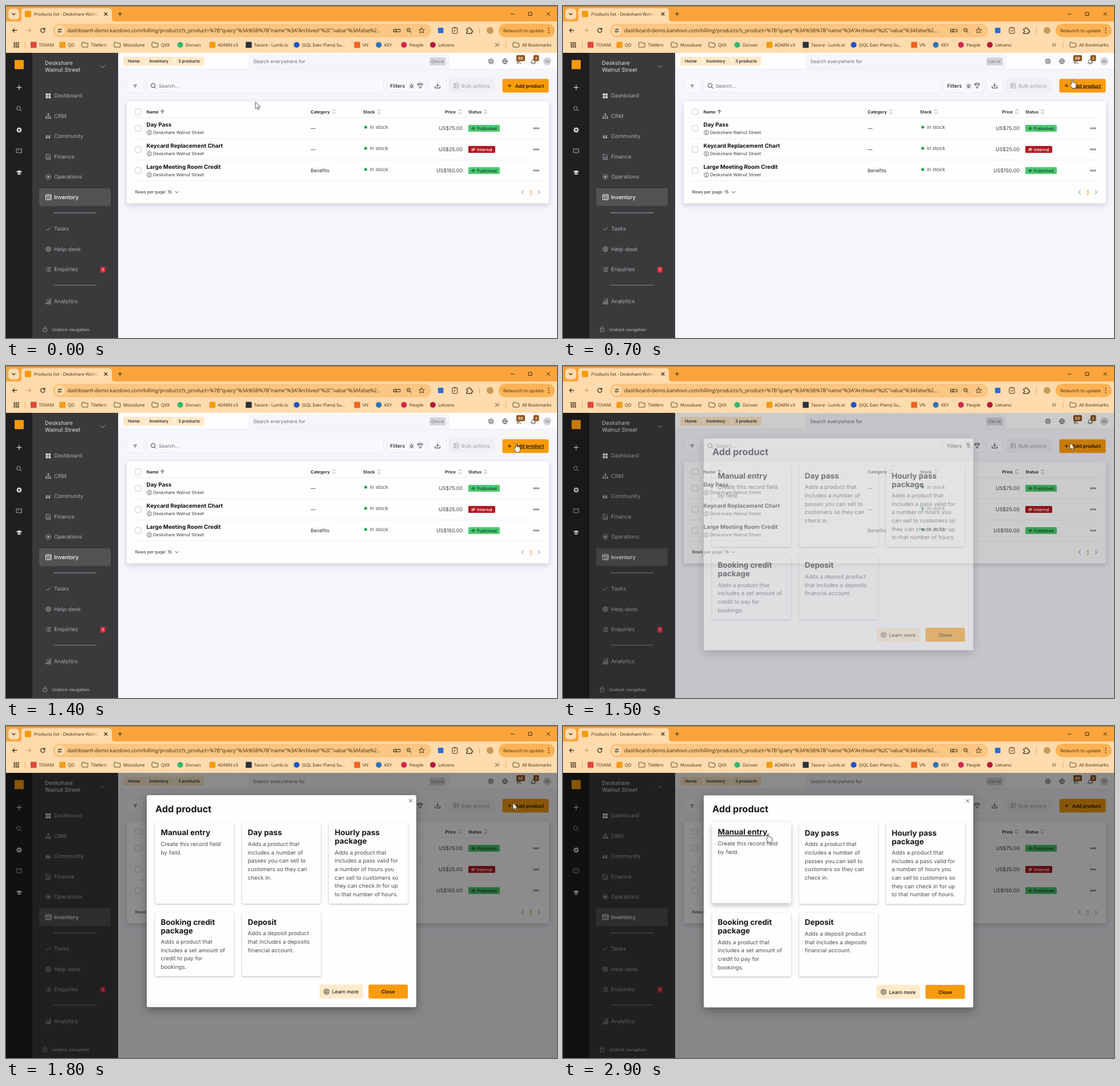
These frames come from a looping animation (963x581 px, 3 s). An HTML page:

```html
<!DOCTYPE html>
<html lang="en">
<head>
<meta charset="utf-8">
<title>Products list</title>
<style>
html, body { margin: 0; width: 100%; height: 100%; overflow: hidden; background: #f5f5fb; }
svg { display: block; width: 963px; height: 581px; }
text { font-family: Inter, "Liberation Sans", sans-serif; text-rendering: geometricPrecision; white-space: pre; }
.chrome text { font-family: "Open Sans", "Noto Sans", sans-serif; }
.hover .link { text-decoration: underline; }
.panel { filter: drop-shadow(0 3px 4px rgba(30, 30, 60, .2)); }
.sheet { filter: drop-shadow(0 5px 8px rgba(0, 0, 0, .35)); }
.card { filter: drop-shadow(0 1.5px 1.8px rgba(20, 20, 40, .32)); }
.card.hover { filter: drop-shadow(0 4px 5px rgba(20, 20, 40, .28)); }
</style>
</head>
<body>
<svg id="stage" viewBox="0 0 963 581" xmlns="http://www.w3.org/2000/svg"></svg>
<script>
const text = (x, cy, str, size, fill = '#1c1c1f', weight = 400, extra = '') =>
  `<text x="${x}" y="${cy + size * .36}" font-size="${size}" fill="${fill}" font-weight="${weight}" ${extra}>${str}</text>`;
const END = 'text-anchor="end"', MID = 'text-anchor="middle"', LINK = 'class="link"';
const box = (x, y, w, h, fill, r = 0, extra = '') =>
  `<rect x="${x}" y="${y}" width="${w}" height="${h}" rx="${r}" fill="${fill}" ${extra}/>`;
const dot = (x, y, r, fill, extra = '') => `<circle cx="${x}" cy="${y}" r="${r}" fill="${fill}" ${extra}/>`;
const ring = (x, y, r, color, w = .9) => dot(x, y, r, 'none', `stroke="${color}" stroke-width="${w}"`);
const line = (d, color, w = 1) =>
  `<path d="${d}" fill="none" stroke="${color}" stroke-width="${w}" stroke-linecap="round" stroke-linejoin="round"/>`;
const shape = (d, fill) => `<path d="${d}" fill="${fill}"/>`;

const lens = (x, y, color, r = 3.6) => ring(x, y, r, color, 1) + line(`M${x + r * .7} ${y + r * .7}l2.6 2.6`, color);
const buoy = (x, y, color, r = 4.3) => ring(x, y, r, color) + ring(x, y, r * .45, color) +
  line([[1, 1], [1, -1], [-1, 1], [-1, -1]].map(([a, b]) =>
    `M${x + a * r * .33} ${y + b * r * .33}l${a * r * .36} ${b * r * .36}`).join(''), color);
const folder = x => line(`M${x} 64.5q0-1 1-1h3l1.4 1.5h4.2q1 0 1 1v5q0 1-1 1h-8.6q-1 0-1-1z`, '#4a3a24', .9);
const eye = (x, y, color) => line(`M${x - 3.2} ${y}q3.2-4.4 6.4 0q-3.2 4.4-6.4 0z`, color, .8) + dot(x, y, 1.1, color);
const grid = (x, y, color) => [0, 1, 2, 3].map(i =>
  box(x + (i % 2) * 4.7, y + (i >> 1) * 4.7, 3.8, 3.8, color, .4)).join('');
const list = (x, y, color) => line([-3, 0, 3].map(d => `M${x - 1.6} ${y + d}h5.4M${x - 4} ${y + d}h.2`).join(''), color, 1);

function browser() {
  const ink = '#3b2a13';
  const marks = [
    [57.5, 'TOVAM', '#e0473a', 1], [108, 'QD', '#f59a1d', 1], [148.5, 'Tilefern'], [205, 'Mossdune'], [271, 'QVX'],
    [314, 'Dorvan', '#2fb872'], [370, 'ADMIN v3', '#f79a0a', 1], [433.5, 'Tavora - Lumb.io', '#27313c', 1],
    [517.5, '(SQL Exec Plans) Su...', '#1f55c8'], [623, 'VN', '#f4641e', 1], [661, 'KEY', '#2d73b8'],
    [705, 'People', '#d5264e'], [755.5, 'Letvano', '#b8183c']
  ];
  return box(0, 0, 963, 30, '#fca43c') + box(0, 0, 963, 1, '#b06d22') +
    shape('M22 27q5 0 5-5V9q0-5 5-5h148q5 0 5 5v13q0 5 5 5z', '#ffdbad') +
    box(0, 27, 963, 55, '#ffdbad') +
    box(4, 4.5, 19, 19, '#ffdbad', 6) + line('M11 13l2.5 2.5 2.5-2.5', ink, 1.2) +
    box(33, 8.5, 11, 11, '#f79a0a', 1) +
    `<g clip-path="url(#tab)">${text(49, 14, 'Products list - Deskshare Walnut', 7.7, ink)}</g>` +
    box(144, 6, 19, 16, 'url(#fade)') +
    line('M172 11.5l5 5m0-5l-5 5M196 13.8h6.5m-3.25-3.25v6.5', ink, 1.1) +
    line('M882.5 14h6M945 11l5.5 5.5m0-5.5l-5.5 5.5M913.5 11h5.5v5.5h-5.5z', ink, 1) +
    line('M19 42.7h-7.5m3.3-3.4l-3.4 3.4 3.4 3.4', ink, 1.2) +
    line('M36 42.7h7.5m-3.3-3.4l3.4 3.4-3.4 3.4', '#c59a66', 1.1) +
    line('M67.3 40.5a3.7 3.7 0 1 0 .6 2.8M67.9 38.7v2.5h-2.5', ink, 1.2) +
    box(82, 31, 661, 24, '#fbc582', 12) + dot(94, 43, 8.5, '#ffdbad') +
    line('M90.5 41h3M96.5 41h1M90.5 45h1M94.5 45h3', ink) + ring(95, 41, 1.3, ink) + ring(93, 45, 1.3, ink) +
    text(107, 43, 'dashboard-demo.kandovo.com/billing/products?s_product=%7B"query"%3A%5B%7B"name"%3A"Archived"%2C"value"%3Afalse%2...', 8.95, ink) +
    ring(679.8, 43, 2.5, ink, 1.2) + box(682, 40.8, 7, 4.4, 'none', 1, `stroke="${ink}"`) +
    lens(703.5, 42, ink, 3) + line('M702.2 42h2.6', ink, .8) +
    line('M726.5 38l1.4 3.2 3.4.3-2.6 2.3.8 3.4-3-1.8-3 1.8.8-3.4-2.6-2.3 3.4-.3z', ink, .9) +
    box(755, 38, 9.5, 9.5, '#2f6fd0', 1.5) +
    box(780, 38, 9, 10, 'none', 1.2, `stroke="${ink}"`) + line('M782.5 38.3h4M782.5 43l1.5 1.6 2.8-3', ink) +
    line('M805 40h2.5c-.4-3 4-3 3.6 0h2.5v2.7c2.7-.3 2.7 3.8 0 3.5v2h-8.6v-2.3c2.4.2 2.4-3.7 0-3.4z', ink, 1.2) +
    box(827, 37.5, 1, 11, '#f3ab50') + dot(846, 42.7, 6, '#c79b56') +
    box(861, 31, 98, 23.5, '#fdb355', 12) + text(869, 42.7, 'Relaunch to update', 7.8, ink) +
    [38.7, 42.7, 46.7].map(y => dot(948.5, y, 1, ink)).join('') +
    [0, 1, 2, 3, 4, 5, 6, 7, 8].map(i => box(13.5 + i % 3 * 3.4, 63.5 + (i / 3 | 0) * 3.4, 2.3, 2.3, ink)).join('') +
    box(33, 62.5, 1, 11, '#f3ab50') +
    marks.map(([x, name, color, square]) =>
      (!color ? folder(x - 16) : square ? box(x - 14.5, 62.8, 10.5, 10.5, color, 1) : dot(x - 9.5, 68, 5, color)) +
      text(x, 68, name, 7.7, ink)).join('') +
    line('M855.5 65.5l2.5 2.5-2.5 2.5M859 65.5l2.5 2.5-2.5 2.5', ink) +
    box(873.5, 62.5, 1, 11, '#f3ab50') + folder(886) + text(902, 68, 'All Bookmarks', 7.7, ink);
}

function sidebar() {
  const g = '#adacb0', w = '#e3e2e5', red = '#d92f3c';
  const items = [[157, 'Dashboard'], [192.5, 'CRM'], [228, 'Community'], [263.5, 'Finance'], [299, 'Operations'],
    [390, 'Tasks'], [425.5, 'Help-desk'], [461, 'Enquiries'], [516.5, 'Analytics']];
  return box(0, 82, 46, 499, '#1f1e20') + box(46, 82, 150, 499, '#3a393c') +
    box(15, 94.5, 16, 16, '#f79a0a', 1) +
    line('M19 142.5h8m-4-4v8', w, 1.2) + lens(22, 179, g, 3.3) +
    ring(23, 217, 2.7, w, 2) + line([0, 1, 2, 3, 4, 5, 6, 7].map(i => {
      const a = i * Math.PI / 4, c = Math.cos(a), s = Math.sin(a);
      return `M${23 + 3.6 * c} ${217 + 3.6 * s}l${c * .7} ${s * .7}`;
    }).join(''), w, 1.5) +
    line('M18.5 250h9v6.5h-3l-1.5 1.7-1.5-1.7h-3z', g) + dot(21.5, 253, .7, g) + dot(24.5, 253, .7, g) +
    shape('M17.5 290l5.5-2.6 5.5 2.6-5.5 2.6zM20 292.2l3 1.4 3-1.4v2.3q-3 1.6-6 0z', w) +
    text(68, 100, 'Deskshare', 9.6, '#c9c8cb', 500) + text(68, 112, 'Walnut Street', 9.6, '#c9c8cb', 500) +
    line('M165.5 104.5l3.5 3.3 3.5-3.3', g) +
    items.map(([y, name]) => text(84, y, name, 9.5, g)).join('') +
    grid(69.5, 153, w) +
    line('M74 189v3.5M70.5 196v-3.5h7v3.5', g, .9) +
    [[74, 189], [70.5, 196], [74, 196], [77.5, 196]].map(([x, y]) => box(x - 1.2, y - 1.2, 2.4, 2.4, g)).join('') +
    [69.6, 74].map(x => shape(`M${x + 3.4} 225.5q-3.4.6-3.4 4v2h3.2v-3.2h-1.5q.1-1.2 1.7-1.5z`, g)).join('') +
    line('M70.5 259.5h4.5l2.5 2.5v6.5h-7zM72.5 264h3M72.5 266h3', g, .9) +
    ring(74, 299, 4.2, g) + dot(74, 299, 2, g) +
    box(58, 319, 125, 31, '#535255', 3) + box(69.5, 330, 9.5, 9, 'none', .8, 'stroke="#fff"') +
    line('M69.5 332.5h9.5M73 332.5v6.5M75 334.8h2.5M75 337h2.5', '#fff', .8) +
    text(84, 334.5, 'Inventory', 9.5, '#fff', 500) +
    box(83, 361.5, 75, 1, '#a3a2a5') + box(83, 488, 75, 1, '#858487') +
    line('M70.5 390.5l2.2 2.2 4.8-5', g) + buoy(74, 425.5, g) + list(74, 461, g) +
    box(164.8, 456.5, 9, 10, red, 1.5) + text(169.3, 461.5, '1', 7, '#fff', 500, MID) +
    line('M70 519v2.5h1.7v-2.5zM73.2 517v4.5h1.7v-4.5zM76.4 514.5v7h1.7v-7zM70 515.5l3-2.5M75 513l3-1.5', g, .8) +
    box(65, 565, 6.5, 5, 'none', .8, `stroke="${g}" stroke-width=".8"`) + line('M66.3 565v-1.5a2 2 0 0 1 4 0', g, .8) +
    text(80.5, 566, 'Undock navigation', 7.4, '#bcbbbe');
}

function topbar() {
  const ink = '#3a3a3f', black = '#1c1c1f';
  const badge = (x, w, n) => box(x - w / 2, 86, w, 10.5, '#8b500f', 2) + text(x, 91.3, n, 7, '#fff', 600, MID);
  return box(195.5, 82, 768, 29, '#fdfdff') + box(195.5, 110.5, 768, .8, '#e3e3ea') +
    shape('M208 89h34l4 7.7-4 7.7h-34q-3 0-3-3v-9.4q0-3 3-3z' +
      'M243.5 89h48.5l4 7.7-4 7.7h-48.5l4-7.7z' +
      'M293.5 89h50q3 0 3 3v9.4q0 3-3 3h-50l4-7.7z', '#ffe8c5') +
    text(213, 96.8, 'Home', 7.4, black, 500) + text(250.5, 96.8, 'Inventory', 7.4, black, 500) +
    text(301, 96.8, '3 products', 7.4, black, 500) +
    box(425, 85, 349, 24, '#f5f5fa', 3, 'stroke="#ebebf1" stroke-width=".7"') +
    text(432, 96.8, 'Search everywhere for', 8.45, '#6d6d74') +
    box(740, 90, 28.5, 14, '#d6d6da', 2) + text(754.2, 97, 'Ctrl+K', 7.4, '#6d6d74', 400, MID) +
    buoy(847.5, 96.8, ink) + ring(872, 96.8, 4.3, ink) +
    line('M867.7 96.8h8.6M872 92.5q-4 4.3 0 8.6q4-4.3 0-8.6', ink, .8) +
    line('M892.5 95l1.5 5.5 2-.5-.5-2.5 5-2M897 98.5l3.5 2.5', ink, .9) + badge(899.5, 15, '66') +
    line('M917.5 99.5q1.5-1 1.5-4a2.7 2.7 0 0 1 5.2 0q0 3 1.5 4zM920.5 101.3h2.2', ink, .9) + badge(926.7, 9.5, '2') +
    dot(946, 96.8, 7, '#d3d3d8') + text(946, 96.9, 'AB', 6, '#77777e', 400, MID);
}

function page() {
  const ink = '#3a3a3f', soft = '#a9a9b2', rule = '#e9e9ef';
  const field = (x, w) => box(x, 127.5, w, 24, '#f9f9fd', 3, 'stroke="#e6e6ed" stroke-width=".8"');
  const sort = x => line(`M${x - 2.5} 183.8l2.5-2.6 2.5 2.6M${x - 2.5} 186.2l2.5 2.6 2.5-2.6`, '#77777e', .8);
  const check = y => box(225.8, y - 5, 10, 10, '#fff', 1.5, 'stroke="#c3c3cb" stroke-width=".9"');
  const heads = [[245.5, 'Name'], [532.5, 'Category'], [624, 'Stock'], [767.5, 'Price'], [808, 'Status']];
  const rows = [['Day Pass', '—', 'US$75.00', true], ['Keycard Replacement Chart', '—', 'US$25.00', false],
    ['Large Meeting Room Credit', 'Benefits', 'US$150.00', true]];
  return box(195.5, 111, 768, 470, '#f5f5fb') +
    field(211, 29.5) + line('M223 138h5.5M224.2 140h3.1M225.2 142h1.1', ink, .9) +
    field(246, 413.5) + lens(257, 139, ink) + text(267, 139.5, 'Search...', 8.55, '#6d6d74') +
    field(665.5, 67.5) + text(671.5, 139.5, 'Filters', 8.7, '#1c1c1f', 500) +
    box(704, 134.5, 10, 10.5, '#e4e4e9', 2) + text(709, 139.8, '0', 7.5, '#1c1c1f', 500, MID) +
    line('M719.5 136q4.3-2.6 8.6 0v1.5l-3 3v3.5l-2.6-1.3v-2.2l-3-3zM719.8 137.3h8', ink, .9) +
    field(739, 30) + line('M754.3 135v5.5m-2.2-2l2.2 2.2 2.2-2.2M750 140.5v3h8.6v-3', ink, 1) +
    box(774.5, 127.5, 80, 24, '#efeff4', 3) + box(783, 135.5, 7.5, 8, 'none', .8, `stroke="${soft}"`) +
    line('M783 138h7.5M783 140.7h7.5M785.5 135.5v8', soft, .8) + text(796, 139.5, 'Bulk actions', 8.6, soft, 500) +
    `<g id="add">${box(867.5, 127.5, 81, 24, '#f99b0b', 3)}${line('M877.3 139.5h5.6m-2.8-2.8v5.6', '#241703')}
      ${text(890, 139.5, 'Add product', 8.4, '#1c1407', 600, LINK)}</g>` +
    box(211, 167, 738, 178.5, '#fefeff', 3, 'class="panel"') +
    check(185) + heads.map(h => text(h[0], 185.2, h[1], 7.45, '#1c1c1f', 600)).join('') +
    line('M273.3 188v-6m-2.8 2.7l2.8-2.8 2.8 2.8', ink) + [573, 651.8, 793, 838].map(sort).join('') +
    rows.map(([name, cat, price, live], i) => {
      const y = 214 + i * 37, tone = live ? '#0d3a1c' : '#fff';
      return box(221, y - 19, 718, .8, rule) + check(y) +
        text(245.5, y - 6.3, name, 9.8, '#111113', 700) +
        ring(250.5, y + 7.5, 4, '#55555c', .8) + line(`M250.5 ${y + 10}q-3.2-3.6 0-5q3.2 1.4 0 5z`, '#55555c', .7) +
        text(257, y + 7.3, 'Deskshare Walnut Street', 7.65, '#3a3a3f') +
        text(532.5, y - .5, cat, 8.45, '#2a2a2e') +
        dot(628.6, y - 2, 2.6, '#27a243') + text(636, y - 1.8, 'In stock', 8.6, '#4b4b52') +
        text(798, y - .6, price, 8.9, '#3f3f46', 400, END) +
        box(808, y - 6, live ? 55 : 47, 12, live ? '#4dca72' : '#b3161f', 1.5) + eye(816.7, y + .2, tone) +
        (live ? '' : line(`M814 ${y + 2.8}l5.4-5.2`, tone, .8)) +
        text(823, y + .2, live ? 'Published' : 'Internal', 7.4, tone, 500) +
        [923, 926.6, 930.2].map(x => ring(x, y, 1.2, '#4b4b52', .9)).join('');
    }).join('') + box(221, 305.8, 718, .8, rule) +
    text(225.8, 325.8, 'Rows per page: 15', 7.4, '#2a2a2e') + line('M295.8 324.5l2.6 2.6 2.6-2.6', ink) +
    line('M904.3 322.5l-3 3.3 3 3.3M930 322.5l3 3.3-3 3.3', '#77777e') +
    text(917, 326, '1', 8.5, '#e88a05', 600, MID + ' text-decoration="underline"');
}

function dialog() {
  const cards = [
    [0, 0, 'Manual entry', 'Create this record field|by field.'],
    [1, 0, 'Day pass', 'Adds a product that|includes a number of|passes you can sell to|customers so they can|check in.'],
    [2, 0, 'Hourly pass|package', 'Adds a product that|includes a pass valid for|a number of hours you|can sell to customers so|they can check in for up|to that number of hours.'],
    [0, 1, 'Booking credit|package', 'Adds a product that|includes a set amount of|credit to pay for|bookings.'],
    [1, 1, 'Deposit', 'Adds a deposit product|that includes a deposits|financial account.']
  ];
  return box(246, 121.5, 471, 371, '#fefeff', 3, 'class="sheet"') +
    text(261, 145.5, 'Add product', 16.2, '#17171a', 700) + line('M704.7 128.5l5.2 5.2m0-5.2l-5.2 5.2', '#3a3a3f', .9) +
    cards.map(([col, row, title, body]) => {
      const x = 260.5 + col * 152, y = 170 + row * 156.5, head = title.split('|');
      return `<g class="card">${box(x, y, 138, row ? 112 : 141.5, '#fefeff', 3)}` +
        head.map((s, i) => text(x + 10, y + 17 + i * 14.7, s, 13.4, '#17171a', 700, LINK)).join('') +
        body.split('|').map((s, i) => text(x + 10, y + 22.2 + head.length * 14.7 + i * 14.65, s, 9.7, '#4d4d54')).join('') + '</g>';
    }).join('') +
    box(548, 453, 76, 24.5, '#ffeacb', 3) + buoy(560.3, 465.3, '#2a2a2e', 4.6) +
    text(570, 465.5, 'Learn more', 8.5, '#1c1c1f', 500) +
    box(633.5, 453, 69, 24.5, '#f99b0b', 3) + text(668, 465.5, 'Close', 8.5, '#1c1407', 600, MID);
}

const stage = document.getElementById('stage');
stage.innerHTML = `<defs><clipPath id="tab"><rect x="48" y="4" width="114" height="20"/></clipPath>
  <linearGradient id="fade"><stop stop-color="#ffdbad" stop-opacity="0"/><stop offset="1" stop-color="#ffdbad"/></linearGradient></defs>
  ${page()}${topbar()}${sidebar()}
  <rect id="shade" y="82" width="963" height="499"/>
  <g class="chrome">${browser()}</g>
  <g id="dialog">${dialog()}</g>
  <g id="cursor" fill="#fff" stroke="#2b2b2e" stroke-width=".8" stroke-linejoin="round">
    <path id="arrow" d="M0 0V11.6L2.7 9.2 4.6 13.4 6.5 12.5 4.7 8.5H8.3Z"/>
    <path id="hand" d="M-1.1 7.8V.9a1.1 1.1 0 0 1 2.2 0V5.2c.6-.7 1.8-.5 2 .3.7-.6 1.8-.3 2 .5.8-.4 1.8 0 1.8 1V10.5c0 2.5-1 3.9-2.2 4.5H.6C-.8 13.4-2.4 11-3.4 9.3c-.6-1 .8-2 1.5-1.3Z"/>
  </g>`;

const [add, shade, modal, cursor, arrow, hand] =
  ['add', 'shade', 'dialog', 'cursor', 'arrow', 'hand'].map(id => document.getElementById(id));
const cards = [...document.querySelectorAll('.card')];

// Each key is [time, ...values], linear in between.
const path = [[0, 436, 168], [100, 455, 167], [200, 550, 158], [300, 690, 147], [400, 800, 138], [500, 860, 133],
  [600, 884, 130], [700, 890, 129], [1100, 891.5, 136], [1400, 891.5, 136], [1500, 886, 134.5], [1900, 886, 134.5],
  [2000, 860, 138], [2100, 700, 162], [2200, 510, 183], [2300, 394.5, 191], [2400, 369, 190], [2500, 359.5, 189.5], [2600, 358.5, 189]];
// Shade opacity, dialog opacity, dialog offset.
const pop = [[1400, 0, 0, 8], [1500, .2, .47, 5], [1600, .45, 1, -2.5], [1700, .45, 1, -1.2], [1800, .45, 1, -.4], [1900, .45, 1, 0]];

function at(keys, t) {
  const i = keys.findIndex(k => k[0] > t);
  if (i < 0) return keys.at(-1).slice(1);
  if (!i) return keys[0].slice(1);
  const a = keys[i - 1], b = keys[i], p = (t - a[0]) / (b[0] - a[0]);
  return a.slice(1).map((v, n) => v + (b[n + 1] - v) * p);
}
const within = (t, from, to) => t >= from && t < to;
const show = (el, on) => el.setAttribute('visibility', on ? 'visible' : 'hidden');

function draw(now) {
  const t = Math.floor(now % 3000 / 100) * 100;
  const [x, y] = at(path, t), [dark, alpha, drop] = at(pop, t);
  cursor.setAttribute('transform', `translate(${x} ${y})`);
  const pointing = within(t, 600, 1500) || within(t, 2100, 2300) || t >= 2400;
  show(hand, pointing);
  show(arrow, !pointing);
  add.setAttribute('class', within(t, 600, 1500) ? 'hover' : '');
  add.setAttribute('transform', `translate(0 ${within(t, 1400, 1600) ? .7 : 0})`);
  shade.setAttribute('opacity', dark);
  modal.setAttribute('opacity', alpha);
  modal.setAttribute('transform', `translate(0 ${drop})`);
  show(modal, alpha > 0);
  const lifted = [t >= 2400, within(t, 2200, 2400), within(t, 2100, 2200)];
  cards.forEach((card, i) => {
    card.setAttribute('class', 'card' + (lifted[i] && t !== 2300 ? ' hover' : ''));
    card.setAttribute('transform', `translate(0 ${lifted[i] ? -1.4 : 0})`);
  });
  requestAnimationFrame(draw);
}
draw(performance.now());
</script>
</body>
</html>
```
